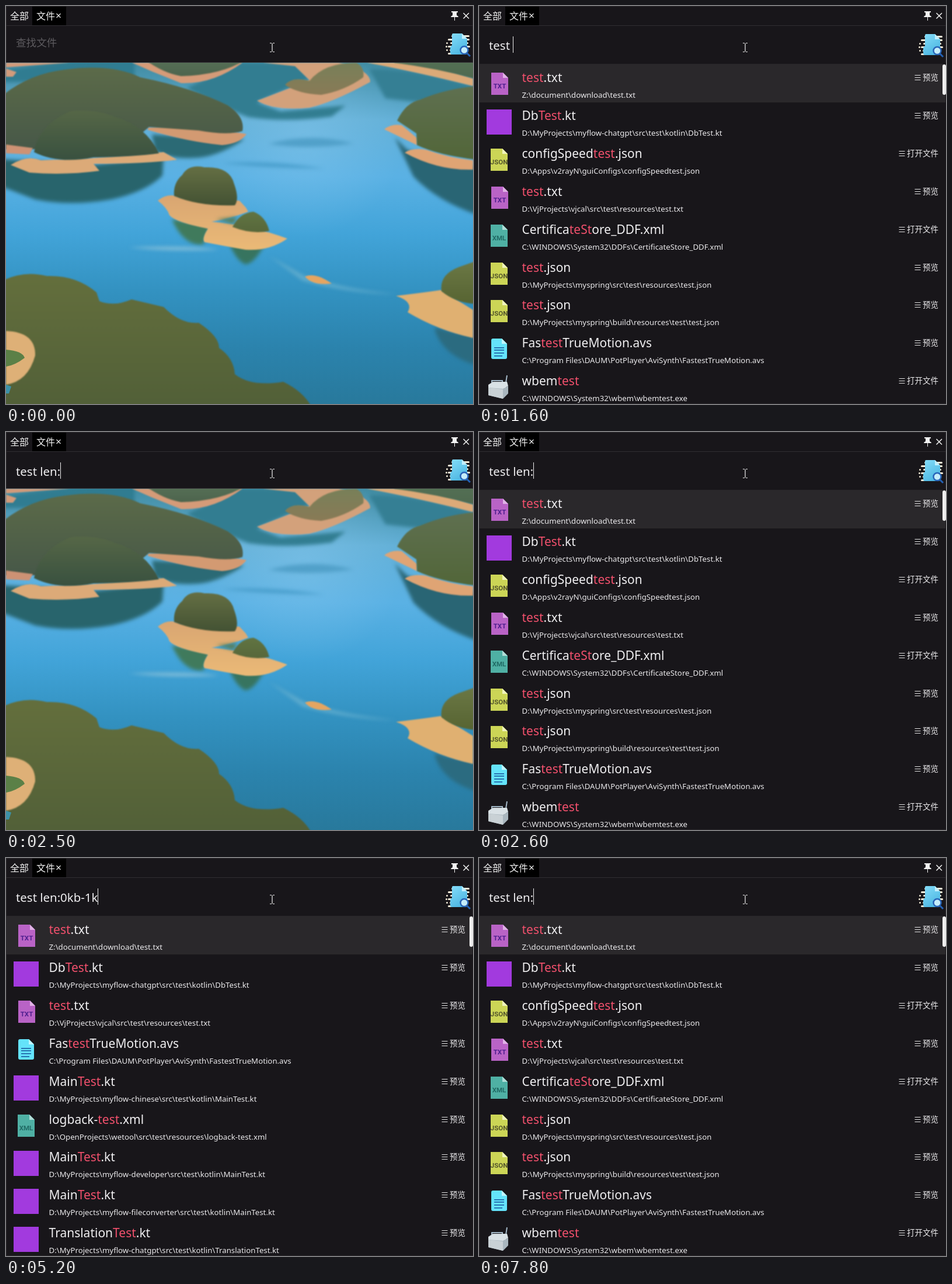
These frames come from a looping animation (800x681 px, 8000 ms). An HTML page with a canvas:

```html
<!DOCTYPE html>
<html lang="zh">
<head>
<meta charset="utf-8">
<style>
html, body { margin: 0; width: 100%; height: 100%; overflow: hidden; background: #18161a; }
canvas { display: block; }
</style>
</head>
<body>
<canvas id="stage" width="800" height="681"></canvas>
<script>
const LOOP = 8000;
const stage = document.getElementById('stage');
const ctx = stage.getContext('2d');
const latin = size => `${size}px "Noto Sans", sans-serif`;
const han = size => `${size}px "Noto Sans CJK SC", "Noto Sans CJK", sans-serif`;

// Each keystroke: time and the resulting query; the caret restarts its blink here.
const keys = [
  [-600, ''], [900, 'te'], [1000, 'tes'], [1100, 'test'], [1400, 'test '],
  [1700, 'test l'], [1900, 'test le'], [2000, 'test len'], [2500, 'test len:'],
  [3100, 'test len:0'], [3300, 'test len:0k'], [3600, 'test len:0kb'],
  [4300, 'test len:0kb-'], [4900, 'test len:0kb-1'], [5200, 'test len:0kb-1k'],
  [5400, 'test len:0kb-1kb'], [6700, 'test len:0kb-1k'], [6800, 'test len:0kb-1'],
  [7000, 'test len:0kb-'], [7100, 'test len:0kb'], [7300, 'test len:0k'],
  [7500, 'test len:0'], [7600, 'test len:']
];

// Name (match between asterisks), folder, icon, whether the action is "open".
const txtDownload = ['*test*.txt', 'Z:\\document\\download\\', 'TXT'];
const dbTest = ['Db*Test*.kt', 'D:\\MyProjects\\myflow-chatgpt\\src\\test\\kotlin\\', 'square'];
const txtResource = ['*test*.txt', 'D:\\VjProjects\\vjcal\\src\\test\\resources\\', 'TXT'];
const motionScript = ['Fas*test*TrueMotion.avs', 'C:\\Program Files\\DAUM\\PotPlayer\\AviSynth\\', 'doc'];
const mainTest = project =>
  ['Main*Test*.kt', `D:\\MyProjects\\myflow-${project}\\src\\test\\kotlin\\`, 'square'];

const allFiles = [
  txtDownload, dbTest,
  ['configSpeed*test*.json', 'D:\\Apps\\v2rayN\\guiConfigs\\', 'JSON', true],
  txtResource,
  ['Certifica*teSt*ore_DDF.xml', 'C:\\WINDOWS\\System32\\DDFs\\', 'XML', true],
  ['*test*.json', 'D:\\MyProjects\\myspring\\src\\test\\resources\\', 'JSON'],
  ['*test*.json', 'D:\\MyProjects\\myspring\\build\\resources\\test\\', 'JSON'],
  motionScript,
  ['wbem*test*', 'C:\\WINDOWS\\System32\\wbem\\', 'toolbox', true, '.exe']
];
const smallFiles = [
  txtDownload, dbTest, txtResource, motionScript, mainTest('chinese'),
  ['logback-*test*.xml', 'D:\\OpenProjects\\wetool\\src\\test\\resources\\', 'XML'],
  mainTest('developer'), mainTest('fileconverter'),
  ['Translation*Test*.kt', 'D:\\MyProjects\\myflow-chatgpt\\src\\test\\kotlin\\', 'square']
];
const views = [[0, null], [1200, allFiles], [1800, null], [2600, allFiles],
  [4900, smallFiles], [7100, allFiles]];

const latest = (list, t) => list.filter(item => item[0] <= t).pop();

function text(str, x, y, font, color) {
  ctx.font = font;
  ctx.fillStyle = color;
  ctx.fillText(str, x, y);
  return x + ctx.measureText(str).width;
}

function rect(x, y, w, h, color, radius = 0) {
  ctx.fillStyle = color;
  ctx.beginPath();
  ctx.roundRect(x, y, w, h, radius);
  ctx.fill();
}

function stroke(d, color, width) {
  ctx.strokeStyle = color;
  ctx.lineWidth = width;
  ctx.stroke(new Path2D(d));
}

function fill(d, color, c = ctx) {
  c.fillStyle = color;
  c.fill(new Path2D(d));
}

// Soft, flat rendition of the lake view, painted once.
function paintLake() {
  const layer = document.createElement('canvas');
  layer.width = 800;
  layer.height = 681;
  const c = layer.getContext('2d');
  const ramp = (y0, y1, ...colors) => {
    const g = c.createLinearGradient(0, y0, 0, y1);
    colors.forEach((color, i) => g.addColorStop(i / (colors.length - 1), color));
    return g;
  };
  const soft = (blur, d, color) => {
    c.filter = `blur(${blur}px)`;
    fill(d, color, c);
    c.filter = 'none';
  };
  const water = (d, color) => soft(3, d, color);
  const sand = (d, color = '#dcaa78') => soft(0.8, d, color);
  const trees = (d, y0, y1, top = '#606d47', low = '#3a4d3d') =>
    soft(1.2, d, ramp(y0, y1, top, low));

  c.fillStyle = ramp(97, 681, '#418ca2', '#63b0d7', '#5ab1e4', '#42a4d9', '#3392c1', '#2b83ad', '#28799c');
  c.fillRect(0, 97, 800, 584);
  const glow = c.createRadialGradient(510, 225, 10, 510, 225, 170);
  glow.addColorStop(0, '#8ccbf066');
  glow.addColorStop(1, '#8ccbf000');
  c.fillStyle = glow;
  c.fillRect(0, 97, 800, 584);

  water('M310 140L400 97H500L520 125L430 165L470 180L582 170L558 189Q480 200 415 190Q360 170 310 140Z', '#327d91');
  water('M622 108Q700 105 810 140L720 166L650 158Z', '#357f94');
  water('M-10 112Q100 90 220 92V130H-10Z', '#307c91');
  water('M450 236Q520 216 595 235Q520 247 450 236Z', '#51a0c9');
  water('M370 269Q450 263 545 278Q450 278 370 269Z', '#4a9fcd');
  water('M-10 262L150 272L270 258L268 290Q240 318 180 331Q110 343 50 331L-10 308Z', '#28646c');
  water('M250 220L408 228Q360 260 320 260Q280 262 255 248Z', '#2b6a75');
  water('M666 225L686 245Q740 270 810 274V358Q740 335 698 292Z', '#296574');
  water('M735 550Q770 560 810 565V616Q750 600 735 556Z', '#2b6b80');
  water('M284 365L350 375L338 408Q305 412 284 365Z', '#407a5c');
  water('M383 408L442 410Q425 441 410 442Q395 436 383 408Z', '#37745f');
  water('M210 413Q320 409 365 417Q280 421 210 413Z', '#7dbbd8');
  water('M450 427Q490 450 512 462Q585 486 670 493Q590 492 508 470Z', '#5eabcd');

  sand('M0 105L110 97H0ZM0 107L18 113L12 121H0Z', '#d29b7b');
  sand('M216 97L250 112L300 132Q355 134 405 97Z', '#d59b78');
  trees('M238 92H410Q370 118 300 120Q270 115 238 92Z', 97, 120, '#556e55', '#4d644d');
  sand('M430 162Q470 147 520 127L495 103L440 97H570Q625 110 624 130Q560 165 520 174Q460 180 430 162Z', '#d3a17b');
  trees('M478 135Q490 120 520 128Q545 97 600 97Q615 105 612 122Q580 145 540 152Q500 150 478 135Z', 97, 155, '#788059', '#8a7a56');
  sand('M618 97Q700 112 800 137V124Q740 103 680 97Z');
  trees('M665 92H806V125Q740 107 665 97Z', 97, 125, '#536f54', '#4f694f');

  sand('M243 208Q320 202 412 219Q400 236 370 238Q310 232 243 212Z', '#d39a72');
  trees('M-6 153Q40 116 100 109Q180 98 230 122Q320 140 380 170Q410 190 405 214Q380 222 330 213L245 207L200 245H-6Z', 104, 245, '#5c6b49', '#475848');
  sand('M0 237L46 243L40 254L0 252Z', '#cd9274');
  sand('M8 272Q35 254 60 264L150 260L270 250L293 263Q240 270 150 270L160 282Q100 290 40 285Z');
  trees('M48 250Q55 205 110 180Q150 175 185 189Q240 205 262 252Q220 258 150 259Q90 271 48 250Z', 178, 266, '#566747', '#38503f');

  sand('M648 211Q660 201 678 204L704 226V238ZM683 251Q695 242 720 246Q760 260 800 264V280Q740 282 683 251Z', '#dfa474');
  trees('M670 196Q685 165 710 160Q755 141 806 137V263Q740 255 704 238L703 218Z', 138, 262, '#5f7050', '#526639');

  sand('M260 333Q278 318 300 328L400 333L411 345L415 352Q380 365 352 369Q420 375 482 398Q450 420 410 417Q370 410 340 404Q335 398 346 381Q290 370 280 358Q276 345 260 333Z',
    ramp(325, 418, '#d9a672', '#ebba77'));
  water('M360 365L396 361L390 373Z', '#557d59');
  trees('M288 325Q286 303 302 289Q313 270 340 276Q384 274 391 305Q400 330 392 341Q330 343 288 325Z', 273, 343, '#667044', '#425133');
  trees('M388 378Q400 354 424 352Q445 360 451 385Q420 391 388 378Z', 352, 390, '#617442', '#56663a');
  sand('M512 463Q530 455 558 475Q526 479 512 463Z', '#e5a561');

  sand('M668 496Q710 491 745 486L800 520V568Q740 555 688 524Q699 506 668 496Z', '#e0b071');
  trees('M746 488Q742 460 775 447L806 436V510Q770 508 746 488Z', 440, 510, '#6a7744', '#576432');
  trees('M-6 470Q30 452 70 462Q120 460 155 490L160 505Q185 515 215 502L270 515Q300 545 330 542Q365 565 365 585Q390 602 392 630Q420 652 475 643Q510 660 524 687H-6Z',
    458, 681, '#646f3d', '#526038');
  sand('M0 556Q51 558 50 598Q38 642 0 648Z', '#deb077');
  fill('M0 588Q28 590 32 602Q15 615 0 617Z', '#5b8047', c);
  fill('M0 648L9 651L5 663H0Z', '#3c91a8', c);
  return layer;
}
const lake = paintLake();

const sheets = {
  TXT: ['#b963c6', '#e0b2e6', '#50208f'],
  JSON: ['#ccd556', '#f0f3bd', '#55572c'],
  XML: ['#4fb0a4', '#b1ded8', '#216b65']
};

function drawIcon(kind, y) {
  if (kind === 'square') return rect(13, y + 77, 43, 43, '#a23ade');
  if (kind === 'doc') {
    fill(`M24 ${y + 80}H39L48 ${y + 89}V${y + 112}Q48 ${y + 115} 45 ${y + 115}H24Q21 ${y + 115} 21 ${y + 112}V${y + 83}Q21 ${y + 80} 24 ${y + 80}Z`, '#64e3fa');
    fill(`M39 ${y + 80}L48 ${y + 89}H39Z`, '#c0f5ff');
    [95, 99, 104, 109].forEach((dy, i) => rect(26, y + dy, i === 3 ? 14 : 17, 1.5, '#16539c'));
    return;
  }
  if (kind === 'toolbox') {
    stroke(`M22 ${y + 92}V${y + 87}H40V${y + 91}M44 ${y + 103}L48 ${y + 78}`, '#a5b9c8', 2);
    fill(`M16 ${y + 94}L24 ${y + 89}H48L50 ${y + 96}L42 ${y + 101}H16Z`, '#d9e1e5');
    fill(`M16 ${y + 99}L42 ${y + 101}L50 ${y + 96}V${y + 109}L41 ${y + 118}L16 ${y + 112}Z`, '#a9b6be');
    fill(`M16 ${y + 99}L41 ${y + 102}V${y + 118}L16 ${y + 112}Z`, '#c9d1d5');
    return;
  }
  const [body, fold, ink] = sheets[kind];
  const x = kind === 'TXT' ? 21 : 20;
  fill(`M${x} ${y + 79}H${x + 20}L${x + 29} ${y + 88}V${y + 117}H${x}Z`, body);
  fill(`M${x + 20} ${y + 79}L${x + 29} ${y + 88}H${x + 20}Z`, fold);
  ctx.textAlign = 'center';
  text(kind, x + 14.5, y + 106, 'bold 11.5px Roboto, sans-serif', ink);
  ctx.textAlign = 'left';
}

function drawRow([name, folder, icon, opens, extension = ''], index) {
  const y = Math.round(index * 64.9) + 35;
  drawIcon(icon, y);
  let x = 73.5;
  name.split('*').forEach((part, i) => {
    x = text(part, x, y + 95, latin(21), i % 2 ? '#f0506c' : '#f0eff1');
  });
  text(folder + name.replaceAll('*', '') + extension, 73.5, y + 121.5, latin(13.25), '#ebeaec');
  const left = opens ? 733 : 760;
  text(opens ? '打开文件' : '预览', left, y + 92, han(13.5), '#ecebed');
  [83, 87, 91].forEach(dy => rect(left - 13.5, y + dy, 10, 1, '#e0e0e0'));
}

function drawList(files) {
  rect(0, 97, 800, 584, '#18161a');
  rect(1, 99, 798, 66, '#2a282b');
  files.forEach(drawRow);
  rect(794, 100, 6, 52, '#eeeeee', 3);
  rect(0, 97, 1, 584, '#2c2a2e');
  rect(0, 680, 800, 1, '#2c2a2e');
}

function drawSearchIcon(dy) {
  ctx.save();
  ctx.translate(0, dy);
  [[763, 50, 31], [757, 56, 37], [761, 62, 31], [757, 68, 38], [760, 74, 32], [757, 80, 25]]
    .forEach(([x, y, w]) => rect(x, y, w, 3, '#f5ecd9', 1.5));
  [[754, 62], [753, 68], [754, 74]].forEach(([x, y]) => rect(x, y, 3, 3, '#f5ecd9', 1.5));
  const blue = ctx.createLinearGradient(763, 47, 787, 83);
  blue.addColorStop(0, '#83dcf9');
  blue.addColorStop(1, '#46b2df');
  fill('M766 47H781L790 56V80Q790 83 787 83H764Q761 83 761 80V70L764 67V49Q764 47 766 47Z', blue);
  fill('M781 47L790 56H781Z', '#c1efff');
  stroke('M790 81L795 86', '#2361b5', 3);
  ctx.beginPath();
  ctx.arc(785, 75.5, 6.5, 0, Math.PI * 2);
  ctx.fillStyle = '#c5edfa';
  ctx.fill();
  ctx.lineWidth = 2.5;
  ctx.strokeStyle = '#2864b8';
  ctx.stroke();
  ctx.restore();
}

function drawHeader(query, caretOn, listed) {
  rect(0, 0, 800, 97, '#18161a');
  rect(0, 0, 800, 1, '#2c2a2e');
  rect(0, 0, 1, 97, '#2c2a2e');
  rect(799, 0, 1, 97, '#2c2a2e');
  rect(0, 33, 800, 1, '#302e32');
  if (!listed) rect(0, 96, 800, 1, '#343236');
  rect(45, 1, 58, 32, '#000');
  text('全部', 7, 22.5, han(16), '#f2f2f2');
  text('文件', 52, 22.5, han(16), '#f2f2f2');
  stroke('M86.5 13L93.5 20M93.5 13L86.5 20', '#f2f2f2', 1.1);
  stroke('M783.5 12L793 21.5M793 12L783.5 21.5', '#f2f2f2', 1.5);
  fill('M763 9H774V11H772V16Q775 17 775 19H769V25H768V19H762Q762 17 765 16V11H763Z', '#f2f2f2');
  drawSearchIcon(listed ? 1 : 0);

  let caretX = 17;
  if (query) caretX = text(query, 17, 75, latin(20.4), '#f0eff1');
  else text('查找文件', 17, 69, han(17.6), '#5d5b5f');
  if (caretOn) rect(Math.round(caretX), 52, 1, 28, '#eeeeee');
  stroke('M452 63.5H455M457 63.5H460M456 64V78M452 78.5H455M457 78.5H460', '#f2f2f2', 1.2);
}

function draw(now) {
  const t = now % LOOP;
  const [typedAt, query] = latest(keys, t);
  const files = latest(views, t)[1];
  if (files) drawList(files);
  else ctx.drawImage(lake, 0, 0);
  drawHeader(query, (t - typedAt) % 1000 < 500, Boolean(files));
}

const start = performance.now();
function tick() {
  draw(performance.now() - start);
  requestAnimationFrame(tick);
}
tick();
</script>
</body>
</html>
```
